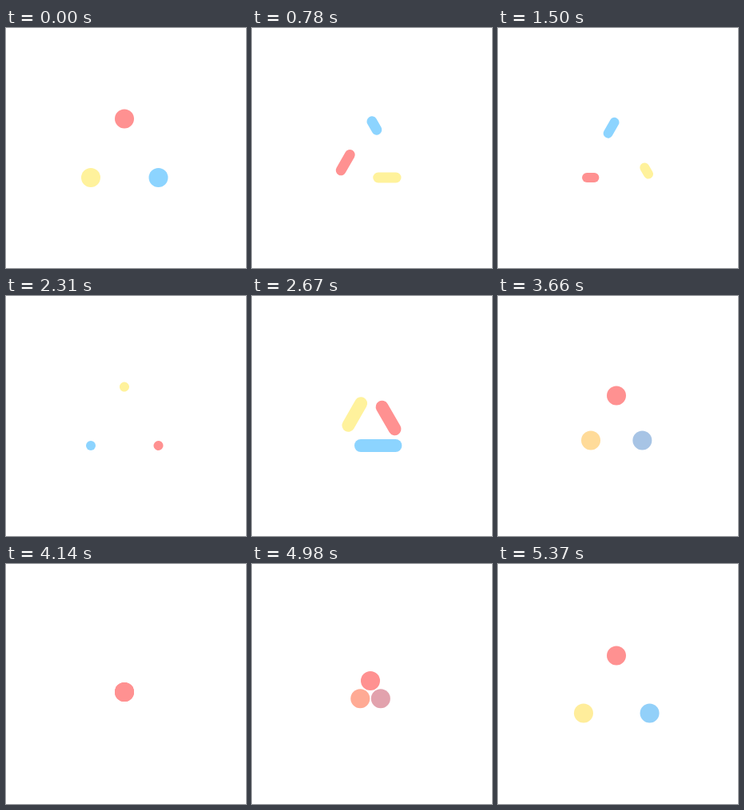
Recreate the animation shown at these times as an HTML page. Size 300 px wide and 300 px high, loop 5400 ms.

```html
<!DOCTYPE html>
<html lang="en">
<head>
<meta charset="utf-8">
<title>Three dots</title>
<style>
  html, body { margin: 0; width: 100%; height: 100%; overflow: hidden; background: #fff; }
  svg { display: block; width: 100%; height: 100%; }
  path { fill: none; stroke-linecap: round; }
</style>
</head>
<body>
<svg id="stage" viewBox="0 0 300 300"></svg>
<script>
const LOOP = 5400, SPAN = 700, BIG = 24, SMALL = 12;
const CENTER = [148, 160];
// top, bottom left, bottom right
const CORNERS = [[148, 113.5], [106, 187], [190.5, 187]];
const RED = [255, 145, 145];

const clamp = v => Math.min(1, Math.max(0, v));
const mix = (a, b, k) => a + (b - a) * k;
const mixAll = (a, b, k) => a.map((v, i) => mix(v, b[i], k));

// Cubic bezier easing with flat ends: (x1, 0, x2, 1)
function ease(x1, x2) {
  return t => {
    t = clamp(t);
    let lo = 0, hi = 1;
    for (let i = 0; i < 24; i++) {
      const s = (lo + hi) / 2, r = 1 - s;
      if (3 * r * r * s * x1 + 3 * r * s * s * x2 + s * s * s < t) lo = s;
      else hi = s;
    }
    return lo * lo * (3 - 2 * lo);
  };
}

const headEase = ease(.49, .39), tailEase = ease(.77, .61);
const shrinkEase = ease(.5, .2), growEase = ease(.67, .67);
const spreadEase = ease(1 / 3, 2 / 3), tintEase = ease(.33, .83);

const dots = [
  { corner: 2, color: [140, 212, 255], head: ease(.57, 0), tail: ease(.81, .4) },
  { corner: 1, color: [255, 242, 156], head: headEase, tail: tailEase },
  { corner: 0, color: RED, head: headEase, tail: tailEase }
];

const stage = document.getElementById('stage');
for (const dot of dots) {
  dot.path = document.createElementNS('http://www.w3.org/2000/svg', 'path');
  stage.append(dot.path);
}

function draw(dot, from, to, width, color) {
  const set = (name, value) => dot.path.setAttribute(name, value);
  set('d', `M${from[0]} ${from[1]}L${to[0] + .001} ${to[1]}`);
  set('stroke-width', width);
  set('stroke', `rgb(${color.map(Math.round)})`);
}

// Each dot slides along one edge of the triangle, its tail following its head.
function slide(dot, turn, t, width) {
  const a = CORNERS[(dot.corner + turn) % 3];
  const b = CORNERS[(dot.corner + turn + 1) % 3];
  draw(dot, mixAll(a, b, dot.tail(t)), mixAll(a, b, dot.head(t)), width, dot.color);
}

function gather(dot, amount, tint) {
  const p = mixAll(CORNERS[dot.corner], CENTER, amount);
  draw(dot, p, p, BIG, mixAll(dot.color, RED, tint));
}

function render(ms) {
  const since = start => clamp((ms - start) / SPAN);
  for (const dot of dots) {
    if (ms < 1300) {
      const t = since(300);
      slide(dot, 0, t, mix(BIG, SMALL, shrinkEase(t)));
    } else if (ms < 2300) {
      slide(dot, 1, since(1300), SMALL);
    } else if (ms < 3430) {
      const t = since(2300);
      slide(dot, 2, t, mix(SMALL, BIG, growEase(t)));
    } else if (ms < 4720) {
      const k = headEase(since(3430));
      gather(dot, k, k);
    } else {
      const t = (ms - 4720) / 715;
      gather(dot, 1 - spreadEase(t), 1 - tintEase(t));
    }
  }
}

const start = performance.now();
function tick() {
  render((performance.now() - start) % LOOP);
  requestAnimationFrame(tick);
}
tick();
</script>
</body>
</html>
```
